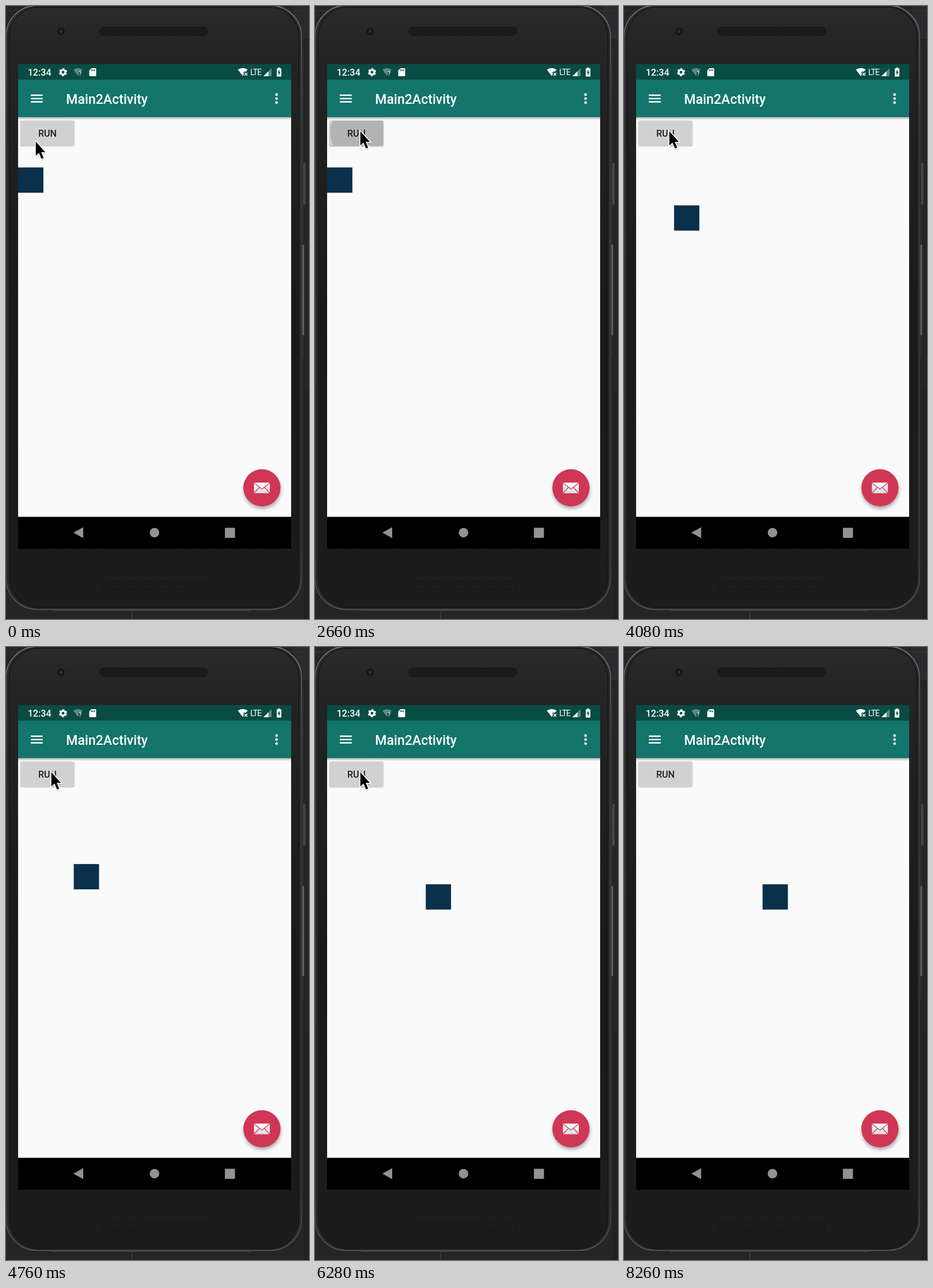
Write an HTML page that moves like this. It is 526 px wide and 1065 px high and loops after 8.28 s.

```html
<!DOCTYPE html>
<html lang="en">
<head>
<meta charset="utf-8">
<title>Run</title>
<style>
  html, body { margin: 0; width: 100%; height: 100%; overflow: hidden; background: #242527; }
  svg { display: block; width: 526px; height: 1065px; }
  text { font-family: Roboto, sans-serif; font-weight: 500; }
</style>
</head>
<body>
<svg viewBox="0 0 526 1065" xmlns="http://www.w3.org/2000/svg">
  <defs>
    <linearGradient id="body" x1="0" y1="0" x2="0" y2="1">
      <stop offset="0" stop-color="#2a292b"/>
      <stop offset=".1" stop-color="#232323"/>
      <stop offset=".5" stop-color="#1a1a1a"/>
      <stop offset="1" stop-color="#1c1c1c"/>
    </linearGradient>
    <linearGradient id="edge" x1="0" y1="0" x2="0" y2="1">
      <stop offset="0" stop-color="#7c7c7c"/>
      <stop offset=".07" stop-color="#585858"/>
      <stop offset=".2" stop-color="#3e3e3e"/>
      <stop offset=".9" stop-color="#3a3a3a"/>
      <stop offset="1" stop-color="#5a5a5a"/>
    </linearGradient>
    <linearGradient id="fade" x1="0" y1="0" x2="0" y2="1">
      <stop offset="0" stop-opacity=".3"/>
      <stop offset="1" stop-opacity="0"/>
    </linearGradient>
    <linearGradient id="paper" x1="0" y1="0" x2="0" y2="1">
      <stop offset="0" stop-color="#fff"/>
      <stop offset="1" stop-color="#dedede"/>
    </linearGradient>
    <pattern id="mesh" width="4" height="4" patternUnits="userSpaceOnUse">
      <rect width="4" height="4" fill="#272727"/>
      <circle cx="1" cy="1" r="1.1" fill="#0b0b0b"/>
      <circle cx="3" cy="3" r="1.1" fill="#0b0b0b"/>
    </pattern>
    <filter id="soft" x="-50%" y="-50%" width="200%" height="200%"><feGaussianBlur stdDeviation="3"/></filter>
    <filter id="fine" x="-20%" y="-20%" width="140%" height="140%"><feGaussianBlur stdDeviation="1.3"/></filter>
    <clipPath id="buttonClip"><rect x="25" y="199" width="93.5" height="43" rx="2"/></clipPath>
    <clipPath id="screenClip"><rect x="21" y="101" width="474" height="842"/></clipPath>
  </defs>

  <!-- desktop and phone body -->
  <rect width="526" height="1065" fill="#242527"/>
  <rect x="500" width="26" height="55" fill="#2b2b2f"/>
  <path d="M0 8.500H526M514 55.500H526" stroke="#353538"/>
  <path d="M517 667H526V1065H517Z" fill="#202123"/>
  <path d="M80 1050.500H425M218.500 1050V1065" stroke="#4b4b4c"/>
  <rect x="516" y="273" width="4" height="72" rx="1" fill="#464647"/>
  <path d="M515.500 70V611" stroke="#38383a"/>
  <rect x="514.500" y="415" width="3" height="157" fill="#626263"/>
  <rect x="0" y="-1" width="513" height="1049.500" rx="54" fill="#2a2a2b" stroke="url(#edge)" stroke-width="1.600"/>
  <rect x="5.500" y="2" width="503" height="1043.500" rx="52" fill="url(#body)" stroke="#161616" stroke-width="1.500"/>
  <circle cx="95.500" cy="44" r="6.500" fill="#161617"/>
  <circle cx="95.500" cy="44" r="3.500" fill="#252529"/>
  <circle cx="96" cy="44" r="1.500" fill="#3e3e43"/>
  <rect x="162.500" y="36.500" width="188" height="15" rx="7.500" fill="url(#mesh)" stroke="#151515"/>
  <rect x="162.500" y="999.500" width="188" height="15" rx="7.500" fill="url(#mesh)" stroke="#151515"/>

  <g clip-path="url(#screenClip)">
    <rect x="21" y="101" width="474" height="842" fill="#fafafa"/>
    <rect x="21" y="193" width="474" height="5" fill="url(#fade)"/>
    <rect x="21" y="101" width="474" height="27" fill="#084c44"/>
    <rect x="21" y="128" width="474" height="65" fill="#13756b"/>
    <rect x="21" y="887.500" width="474" height="56" fill="#000"/>

    <!-- status bar -->
    <g fill="#fff">
      <text x="37.700" y="121" font-size="16.140">12:34</text>
      <circle cx="99" cy="115" r="4" fill="none" stroke="#fff" stroke-width="3.200"/>
      <circle cx="99" cy="115" r="6" fill="none" stroke="#fff" stroke-width="2.200" stroke-dasharray="3.140 3.143" stroke-dashoffset="4.710"/>
      <path d="M117 110.500Q125 105.500 133 110.500L131 113H126V119.500L124.500 121Z" opacity=".35"/>
      <text x="126.300" y="121" font-size="10">?</text>
      <path d="M148.500 108H155Q156.500 108 156.500 109.500V120.500Q156.500 122 155 122H146Q144.500 122 144.500 120.500V112Z"/>
      <path d="M148.700 110V113M151.200 110V113M153.700 110V113" stroke="#084c44" stroke-width="1.300"/>
      <path d="M402.500 110.500Q411 105 419.500 110.500L416.500 114H412.500V119.500L411 121.500Z"/>
      <path d="M414 116L419 121M419 116L414 121" stroke="#fff" stroke-width="1.400"/>
      <text x="424" y="120" font-size="14" style="font-weight:400" letter-spacing="-1">LTE</text>
      <path d="M447 122L461 108V122Z" opacity=".35"/>
      <path d="M447 122L455.500 113.500V122Z"/>
      <path d="M472 108.500V107H476V108.500H478V122.500H470V108.500Z"/>
      <path d="M474.700 110.500L471.500 116H473.500V120.500L476.700 114.500H474.700Z" fill="#084c44"/>
    </g>

    <!-- app bar -->
    <path d="M43 155H63.800M43 160.800H63.800M43 166.500H63.800" stroke="#fff" stroke-width="2.300"/>
    <text x="104.300" y="170" font-size="23.070" fill="#fff">Main2Activity</text>
    <g fill="#fff">
      <circle cx="469.700" cy="153.900" r="2.300"/>
      <circle cx="469.700" cy="160.800" r="2.300"/>
      <circle cx="469.700" cy="167.700" r="2.300"/>
    </g>

    <!-- run button -->
    <rect id="lift" x="25" y="200.500" width="93.500" height="43" rx="2" opacity=".25" filter="url(#fine)"/>
    <rect x="25" y="199" width="93.500" height="43" rx="2" fill="#d1d1d2"/>
    <circle id="ripple" cx="77" cy="219" r="0" fill="#b3b3b3" clip-path="url(#buttonClip)"/>
    <text x="56" y="227" font-size="16.140" fill="#202020">RUN</text>

    <rect id="block" x="21" y="280.500" width="43.900" height="43.900" fill="#0a304c"/>

    <!-- mail button -->
    <circle cx="445" cy="841" r="32" opacity=".35" filter="url(#soft)"/>
    <circle cx="444.300" cy="837" r="32.300" fill="#d03656"/>
    <rect x="430.500" y="828" width="27.500" height="18.500" fill="url(#paper)"/>
    <path d="M430.500 828.500L444.300 839.500L458 828.500M430.500 846.500L440 836.300M458 846.500L448.600 836.300" fill="none" stroke="#d03656" stroke-width="1.300"/>

    <!-- navigation bar -->
    <g fill="#929292">
      <path d="M117 915L134 905.500V924.500Z"/>
      <circle cx="257.800" cy="915" r="8.300"/>
      <rect x="380" y="906.500" width="17.500" height="17.500" rx="1"/>
    </g>
  </g>

  <g id="cursor">
    <path id="shade" d="M1.500 4V30L7.200 25L11.700 35L15.300 33.500L11 24H18.500Z" opacity=".3" filter="url(#fine)"/>
    <path d="M1.700 2.500V27.300L7.200 22.200L11.600 32.500L15.300 31L11 20.900H18.200Z" stroke="#fff" stroke-width="3" paint-order="stroke"/>
  </g>
</svg>
<script>
const LOOP = 8280;
const DEVICE_PIXEL = 0.4392;
const [block, ripple, lift, cursor] =
  ['block', 'ripple', 'lift', 'cursor'].map(id => document.getElementById(id));

// [time, value] pairs, linear in between
const travel = [[2880, 0], [3360, 60], [3520, 80], [4200, 170], [4760, 220], [5600, 330], [6980, 470], [7240, 500]];
const cursorX = [[20, 50], [500, 77], [7680, 77], [8160, -22]];
const cursorY = [[20, 233], [500, 215], [7680, 215], [8160, 250]];
const rippleSize = [[2540, 0], [2660, 50.5], [2700, 62]];
const rippleAlpha = [[2800, 1], [3000, 0]];

function at(keys, t) {
  if (t <= keys[0][0]) return keys[0][1];
  for (let i = 1; i < keys.length; i++) {
    const [t0, a] = keys[i - 1], [t1, b] = keys[i];
    if (t <= t1) return a + (b - a) * (t - t0) / (t1 - t0);
  }
  return keys[keys.length - 1][1];
}

// The picture refreshes at 0, 20 and 120 ms of every 140 ms.
function refreshTime(t) {
  const phase = t % 140;
  return t - phase + (phase < 20 ? 0 : phase < 120 ? 20 : 120);
}

function draw(now) {
  const t = refreshTime(now % LOOP);

  // The block advances ten device pixels per step and stops at (500, 300).
  const distance = Math.floor(at(travel, t) / 10 + 1e-6) * 10;
  const dx = distance * DEVICE_PIXEL, dy = Math.min(distance, 300) * DEVICE_PIXEL;
  block.setAttribute('transform', `translate(${dx} ${dy})`);

  const alpha = at(rippleAlpha, t);
  const radius = at(rippleSize, t);
  ripple.setAttribute('r', radius);
  ripple.setAttribute('opacity', alpha);
  lift.setAttribute('opacity', 0.25 + (radius ? 0.15 * alpha : 0));

  cursor.setAttribute('transform', `translate(${at(cursorX, t)} ${at(cursorY, t)})`);
  cursor.setAttribute('visibility', t < 8160 ? 'visible' : 'hidden');
}

const start = performance.now();
function tick() {
  draw(performance.now() - start);
  requestAnimationFrame(tick);
}
tick();
</script>
</body>
</html>
```
